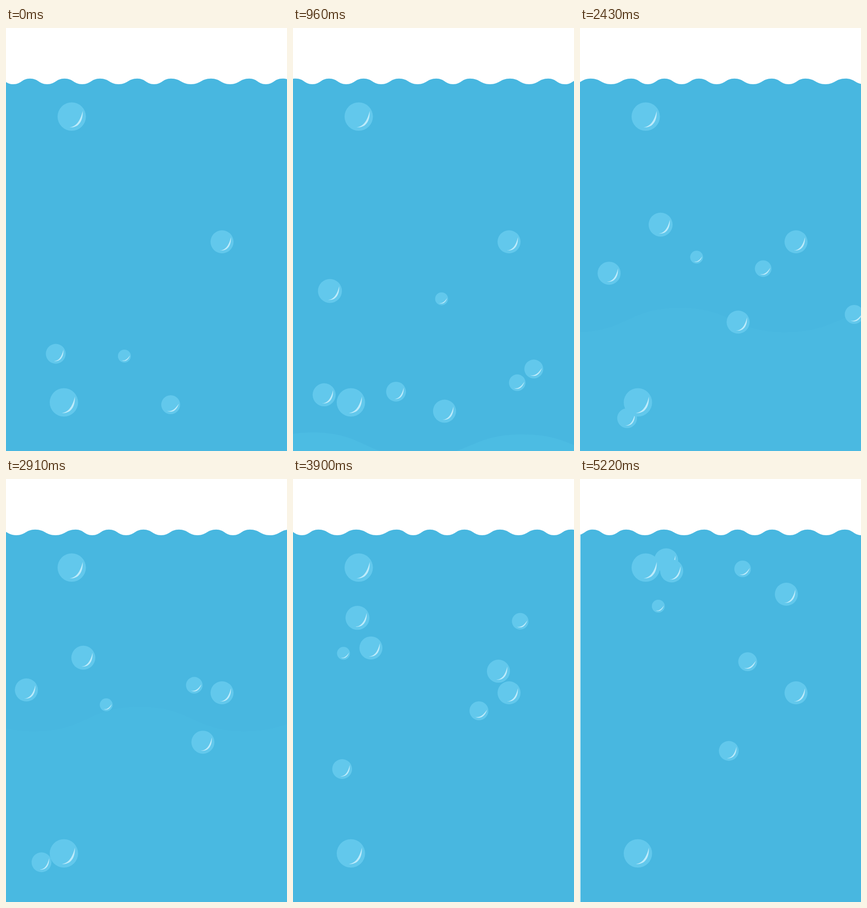
These frames come from a looping animation (610 px wide and 918 px high, 5.25 s). An HTML page with a canvas:

```html
<!DOCTYPE html>
<html lang="en">
<head>
<meta charset="utf-8">
<title>Bubbles under water</title>
<style>
html, body { margin: 0; width: 100%; height: 100%; overflow: hidden; background: #fff; }
canvas { display: block; width: 610px; height: 918px; }
</style>
</head>
<body>
<canvas id="stage" width="610" height="918"></canvas>
<script>
const W = 610, H = 918, LOOP = 5250, STEP = 30, END = LOOP - STEP;
const ctx = document.getElementById('stage').getContext('2d');
const WATER = [72, 183, 224], SWELL = [90, 208, 238];
const BUBBLE = '#62c8ec', SHINE = '#bdebfb';

// Drifting bubbles, back to front; x and y are waypoints evenly spaced in time
const drifters = [
  { r: 26, x: [-190, 147, 173, 140, 187], y: [757, 517, 413, 300, 176.5] },
  { r: 25, x: [-40, 73, 76, 50, 203, 199], y: [745, 783, 498, 365, 199.5] },
  { r: 18, tilt: 20, x: [465, 484, 394, 493, 353], y: [940, 710, 494, 307, 195] },
  { r: 25, x: [350, 327, 301, 452, 440, 448], y: [1018, 773, 615, 415, 250] },
  { r: 14, tilt: 20, x: [257, 324, 275, 199, 94, 170], y: [712, 579, 506, 478, 345, 276] },
  { r: 20.5, tilt: 20, x: [357.5, 532, 567, 621, 343, 364], y: [817.5, 396.5] },
  { r: 21.5, x: [108, 238, 88, 108, 323], y: [707, 795, 845, 810, 581, 590] }
];
const fixed = [[142.7, 192.3, 30.8], [469, 464, 25], [125.7, 812.5, 30.8]];

// Surface: crests at repeating gaps, a valley halfway along each gap
const gaps = [72, 82, 88, 72, 75, 77, 81, 73, 87, 83];
const surface = [[-298, 122]];
for (let i = 0, x = -262; x < 700; x += gaps[i++ % gaps.length]) {
  surface.push([x, 109.8], [x + gaps[i % gaps.length] / 2, 122]);
}

const swell = [];
for (let i = -3; i <= 3; i++) swell.push([228 * i, i % 2 ? 53 : 2.2 * Math.abs(i)]);

function ease(u) {
  u = Math.min(1, Math.max(0, u));
  return u * u * (3 - 2 * u);
}

function mix(a, b, k) {
  return `rgb(${a.map((v, i) => Math.round(v + (b[i] - v) * k))})`;
}

// Smooth curve through evenly spaced values, u from 0 to 1
function along(v, u) {
  const last = v.length - 1, i = Math.min(last - 1, Math.floor(u * last));
  const s = u * last - i, e = ease(s);
  const slope = j => {
    const a = Math.max(0, j - 1), b = Math.min(last, j + 1);
    return (v[b] - v[a]) / (b - a);
  };
  return v[i] * (1 - e) + v[i + 1] * e +
    s * (1 - s) * ((1 - s) * slope(i) - s * slope(i + 1));
}

function fillWave(points, dx, dy, color) {
  ctx.save();
  ctx.translate(dx, dy);
  ctx.fillStyle = color;
  ctx.beginPath();
  points.forEach(([x, y], i) => {
    if (!i) return ctx.moveTo(x, y);
    const [px, py] = points[i - 1], mid = (px + x) / 2;
    ctx.bezierCurveTo(mid, py, mid, y, x, y);
  });
  ctx.lineTo(points[points.length - 1][0], 2 * H);
  ctx.lineTo(points[0][0], 2 * H);
  ctx.fill();
  ctx.restore();
}

function drawBubble(x, y, r, tilt = 0) {
  ctx.save();
  ctx.translate(x, y);
  ctx.fillStyle = BUBBLE;
  ctx.beginPath();
  ctx.arc(0, 0, r, 0, Math.PI * 2);
  ctx.fill();
  ctx.rotate(tilt * Math.PI / 180);
  ctx.scale(r / 31, r / 31);
  ctx.fillStyle = SHINE;
  ctx.beginPath();
  ctx.moveTo(24, -12.5);
  ctx.bezierCurveTo(25, 11, 14, 25.5, -5.5, 23);
  ctx.bezierCurveTo(8, 23, 18.5, 11, 24, -12.5);
  ctx.fill();
  ctx.restore();
}

function draw(t) {
  ctx.fillStyle = '#fff';
  ctx.fillRect(0, 0, W, H);

  const shift = 290 * ease(t / 5190);
  fillWave(surface, shift, 0, mix(WATER, WATER, 0));

  const rise = ease(t / 6500), glow = 0.28 * Math.max(0, 1 - t / 3750);
  if (glow) fillWave(swell, 2 + 683 * rise, 940 - 1057 * rise, mix(WATER, SWELL, glow));

  const u = t / END;
  for (const b of drifters) drawBubble(along(b.x, u), along(b.y, u), b.r, b.tilt);
  for (const b of fixed) drawBubble(...b);

  // Bare strip once the water has slid past the left edge
  ctx.fillStyle = '#fff';
  ctx.fillRect(0, 0, Math.max(0, shift - 289), H);
}

function tick() {
  draw(Math.floor(performance.now() % LOOP / STEP) * STEP);
  requestAnimationFrame(tick);
}
tick();
</script>
</body>
</html>
```
